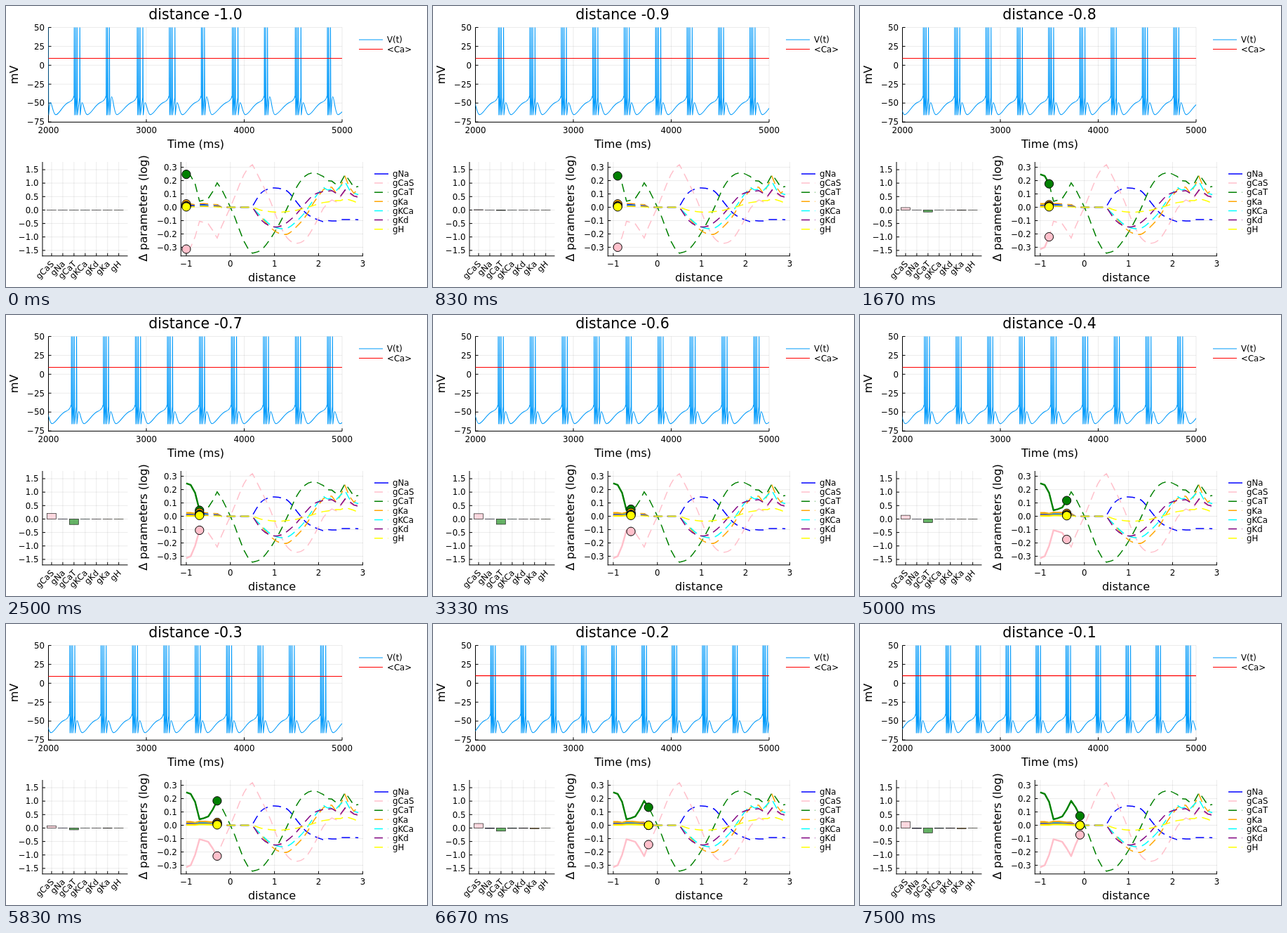
An HTML page that plays this animation: 600 by 400 pixels, repeating every 8 s.

```html
<!DOCTYPE html>
<html lang="en">
<head>
<meta charset="utf-8">
<title>Conductance distance</title>
<style>
html, body { margin: 0; width: 100%; height: 100%; overflow: hidden; background: #fff; }
svg { display: block; width: 600px; height: 400px; }
text { font-family: "DejaVu Sans", sans-serif; font-size: 11.8px; fill: #000; }
.guide { font-size: 16.1px; }
.title { font-size: 20.5px; }
</style>
</head>
<body>
<svg id="stage" viewBox="0 0 600 400" fill="none"></svg>
<script>
const stage = document.getElementById("stage");

function add(tag, attrs, text, parent = stage) {
  const el = document.createElementNS("http://www.w3.org/2000/svg", tag);
  set(el, attrs);
  if (text !== undefined) el.textContent = text;
  parent.appendChild(el);
  return el;
}
function set(el, attrs) {
  for (const k in attrs) el.setAttribute(k, attrs[k]);
}
const line = (x1, y1, x2, y2, stroke, w = 1, extra = {}) =>
  add("line", { x1, y1, x2, y2, stroke, "stroke-width": w, ...extra });
const label = (x, y, text, anchor = "middle", extra = {}) =>
  add("text", { x, y, "text-anchor": anchor, ...extra }, text);
const signed = s => String(s).replace("-", "\u2212");

// Grid, ticks, axes; ticks are [position, text] pairs
function axes(l, t, r, b, xs, ys, slanted) {
  for (const [x] of xs) line(x, t, x, b, "#000", 0.8, { "stroke-opacity": 0.1 });
  for (const [y] of ys) line(l, y, r, y, "#000", 0.8, { "stroke-opacity": 0.1 });
  line(l, t, l, b + 0.5, "#000");
  line(l - 0.5, b, r, b, "#000");
  for (const [x, s] of xs) {
    line(x, b, x, b - 4, "#000");
    if (slanted) label(0, 0, s, "end", { transform: `translate(${x + 4} 368) rotate(-45)` });
    else label(x, b + 15.3, signed(s));
  }
  for (const [y, s] of ys) {
    line(l, y, l + 4, y, "#000");
    label(l - 5.5, y + 4.3, signed(s), "end");
  }
}

const range = (n, f) => Array.from({ length: n }, (_, i) => f(i));
const px = d => 319.8 + 62.87 * d;
const py = v => 286.5 - 0.1897 * v;
const barY = v => 290.5 - 0.0383 * v;

// Thousandths: early = -1..-0.1 by 0.1, mid = 0.5..2.1 by 0.2, tail = 2.2..2.9 by 0.1
const flat = [0, 0, 0, 0, 0];
const curves = [
  { name: "gNa", color: "#0000ff",
    early: [15, 15, 14, 20, 20, 18, 19, 20, 0, 0], rise: flat,
    mid: [8, 108, 141, 142, 118, 40, -40, -82, -108],
    tail: [-100, -103, -103, -92, -92, -92, -92, -93] },
  { name: "gCaS", color: "#ffc0cb",
    early: [-314, -300, -222, -105, -114, -125, -174, -231, -145, -72], rise: [0, 80, 165, 240, 295],
    mid: [320, 190, 50, -118, -235, -270, -240, -140, -12],
    tail: [30, 55, 40, 80, 120, 100, 80, 90] },
  { name: "gCaT", color: "#008000",
    early: [247, 235, 176, 45, 53, 67, 118, 183, 135, 70], rise: [0, -75, -165, -250, -310],
    mid: [-345, -320, -240, -130, 3, 150, 235, 258, 232],
    tail: [200, 196, 170, 185, 245, 200, 150, 155] },
  { name: "gKa", color: "#ffa500",
    early: [25, 25, 19, 28, 28, 25, 22, 20, 0, 0], rise: flat,
    mid: [-5, -75, -150, -195, -200, -145, -70, 40, 130],
    tail: [150, 150, 105, 160, 230, 150, 105, 140] },
  { name: "gKCa", color: "#00ffff",
    early: [11, 11, 9, 15, 15, 13, 11, 10, 0, 0], rise: flat,
    mid: [-5, -70, -130, -158, -155, -105, -35, 65, 150],
    tail: [130, 135, 125, 160, 190, 130, 105, 95] },
  { name: "gKd", color: "#800080",
    early: [8, 8, 7, 10, 10, 9, 8, 8, 0, 0], rise: flat,
    mid: [0, -95, -140, -145, -110, -50, 30, 95, 118],
    tail: [120, 125, 105, 85, 130, 110, 85, 75] },
  { name: "gH", color: "#ffff00",
    early: [3, 3, 3, 6, 6, 5, 4, 3, 0, 0], rise: flat,
    mid: [0, -22, -33, -37, -32, -22, -5, 15, 35],
    tail: [40, 45, 50, 50, 65, 55, 45, 30] }
];

const earlyPoints = (c, n) => c.early.slice(0, n).map((v, i) => [px(-1 + i / 10), py(v)]);
const poly = pts => "M" + pts.map(p => p.map(n => n.toFixed(2)).join(" ")).join("L");

function fullPath(c) {
  const pts = earlyPoints(c, 10);
  c.rise.forEach((v, i) => pts.push([px(i / 10), py(v)]));
  let d = poly(pts);
  const m = c.mid.map((v, i) => [px(0.5 + i * 0.2), py(v)]);
  d += "L" + m[0];
  for (let i = 0; i + 1 < m.length; i++) {
    const a = m[Math.max(0, i - 1)], b = m[i], e = m[i + 1], f = m[Math.min(m.length - 1, i + 2)];
    d += `C${b[0] + (e[0] - a[0]) / 6} ${b[1] + (e[1] - a[1]) / 6} ` +
         `${e[0] - (f[0] - b[0]) / 6} ${e[1] - (f[1] - b[1]) / 6} ${e}`;
  }
  c.tail.forEach((v, i) => { d += `L${px(2.2 + i / 10)} ${py(v)}`; });
  return d;
}

// Voltage panel
const defs = add("defs", {});
const clip = add("clipPath", { id: "volt" }, undefined, defs);
add("rect", { x: 60.5, y: 30.5, width: 418.5, height: 134.8 }, undefined, clip);
axes(60.5, 30.5, 479, 165.3,
  range(4, i => [60.5 + 139.5 * i, 2000 + 1000 * i]),
  range(6, i => [30.5 + 26.92 * i, 50 - 25 * i]));
const title = label(270, 18.7, "", "middle", { class: "title" });
label(270.5, 202, "Time (ms)", "middle", { class: "guide" });
label(0, 0, "mV", "middle", { class: "guide", transform: "translate(16.5 98) rotate(-90)" });
const volt = add("path", { stroke: "#009afa", "stroke-width": 1.05, "stroke-linejoin": "round", "clip-path": "url(#volt)" });
const calcium = line(60.5, 74.5, 479, 74.5, "#ff0000", 1.1);
line(503, 48, 537, 48, "#009afa", 1.1);
line(503, 61.5, 537, 61.5, "#ff0000", 1.1);
label(543, 52.3, "V(t)", "start");
label(543, 65.8, "<Ca>", "start");

// Bar panel
const barNames = ["gCaS", "gNa", "gCaT", "gKCa", "gKd", "gKa", "gH"];
axes(52, 222, 173.5, 355.8,
  barNames.map((s, i) => [65 + 15.95 * i, s]),
  range(7, i => [233 + 19.15 * i, (1.5 - i / 2).toFixed(1)]), true);
const bars = barNames.map((name, i) => {
  const c = curves.find(k => k.name === name);
  const el = add("rect", { x: 58.6 + 15.95 * i, width: 12.8, fill: c.color, "fill-opacity": 0.6,
    stroke: "#000", "stroke-width": 0.7, "stroke-opacity": 0.85 });
  return { c, el };
});

// Parameter panel
axes(249.3, 222, 509, 355.8,
  range(5, i => [px(i - 1), i - 1]),
  range(7, i => [py(300 - 100 * i), (0.3 - i / 10).toFixed(1)]));
label(379, 392, "distance", "middle", { class: "guide" });
label(0, 0, "\u0394 parameters (log)", "middle", { class: "guide", transform: "translate(201 288) rotate(-90)" });
const dash = { "stroke-dasharray": "12 7.5" };
for (const c of curves)
  add("path", { d: fullPath(c), stroke: c.color, "stroke-width": 1.5, ...dash });
for (const c of curves)
  c.trace = add("path", { stroke: c.color, "stroke-width": 2.4, "stroke-linejoin": "round" });
for (const c of curves)
  c.dot = add("circle", { r: 6.1, fill: c.color, stroke: "#000", "stroke-width": 1 });
curves.forEach((c, i) => {
  const y = 239 + 13.12 * i;
  line(525, y, 545, y, c.color, 1.5, i ? dash : {});
  label(551, y + 4.2, c.name, "start");
});

// First burst position and burst period for each step
const starts = [97, 93, 90, 93, 92.7, 92.3, 91.5, 90.5, 82, 79.5];
const periods = [45, 44.8, 44.6, 45.6, 45.55, 45.5, 45.1, 44.7, 43.1, 42.75];
const shortBursts = [1, 4, 6, 8];

function voltPath(step) {
  const irregular = step === 0;
  const tight = step > 7 ? 0.9 : 1;
  const isShort = k => irregular && shortBursts.includes(k);
  let x = starts[step] - periods[step];
  let d = `M${x} 129`;
  for (let k = -1; x < 490; k++) {
    const few = isShort(k);
    const offsets = few ? [0, 1.8, 4.4] : [0, 2, 4.1, irregular ? 8 : 7.3];
    const next = x + periods[step] + (irregular && k >= 0 ? (few ? -0.9 : 0.7) : 0);
    let s = x;
    for (const o of offsets) {
      s = x + o * tight;
      d += `L${s} 130L${s + 0.25} 18L${s + 0.75} 155`;
    }
    const top = few ? 129 : 137.5;
    d += `C${s + 1.6} 150 ${s + 2} ${top} ${s + 3.4} ${top}` +
         `C${s + 5.5} ${top} ${s + 7} 154.7 ${s + 11} 154.7` +
         `C${s + 16} 154.7 ${next - 16} 140.5 ${next - 8} 137.3` +
         `C${next - 3} 135.3 ${next - 1} 132.5 ${next - 0.3} 128`;
    x = next;
  }
  return d;
}

let shown = -1;
function draw(step) {
  if (step === shown) return;
  shown = step;
  const dist = (step - 10) / 10;
  title.textContent = "distance " + dist.toFixed(1);
  set(volt, { d: voltPath(step) });
  const caY = step > 7 ? 73.6 : 74.5;
  set(calcium, { y1: caY, y2: caY });
  for (const { c, el } of bars) {
    const y = barY(c.early[step] - c.early[0]);
    set(el, { y: Math.min(y, 290.5), height: Math.max(0.05, Math.abs(y - 290.5)) });
  }
  for (const c of curves) {
    set(c.trace, { d: step ? poly(earlyPoints(c, step + 1)) : "" });
    set(c.dot, { cx: px(dist), cy: py(c.early[step]) });
  }
}

const LOOP = 8000;
const stepStart = range(10, i => Math.round(i * 250 / 3) * 10);
function tick() {
  const t = performance.now() % LOOP;
  draw(stepStart.filter(s => s <= t).length - 1);
  requestAnimationFrame(tick);
}
tick();
</script>
</body>
</html>
```
